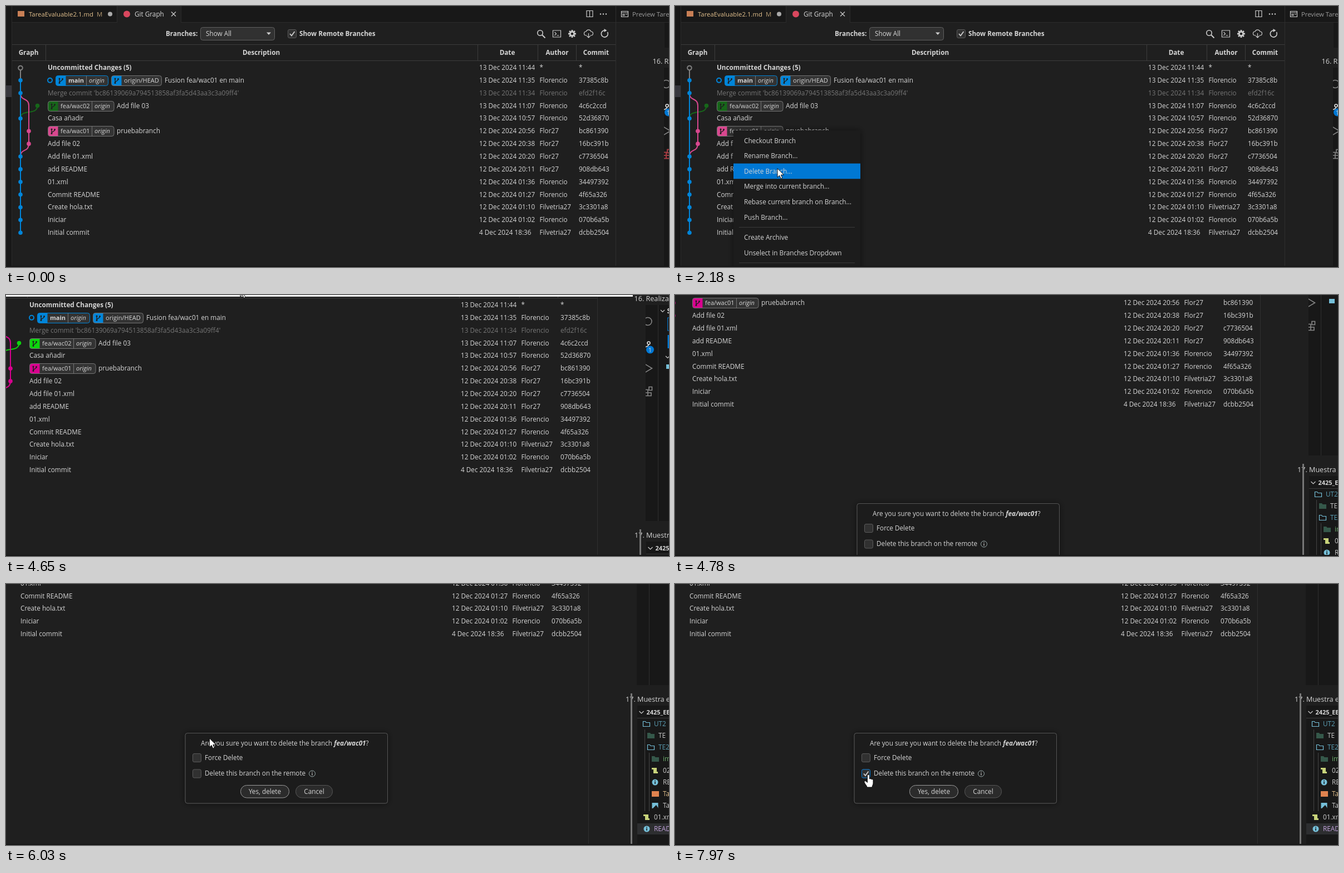
These frames come from a looping animation (1191x470 px, 8000 ms). An HTML page:

```html
<!DOCTYPE html>
<html lang="en">
<head>
<meta charset="utf-8">
<title>Deleting a branch</title>
<style>
  html, body { margin: 0; width: 100%; height: 100%; overflow: hidden; background: #1f1f1f; }
  svg { display: block; }
  text { font: 11.75px "Open Sans", "Noto Sans", sans-serif; fill: #d6d6d6; white-space: pre; }
  .b { font-weight: 700; font-size: 11.7px; }
  .i { font-style: italic; }
  .tag { font-size: 11px; }
  .tab { font-size: 11.35px; }
  .big { font-size: 12.6px; }
  .line { fill: none; stroke: #ccc; stroke-width: 1.2; }
  .dim { fill: none; stroke: #868686; stroke-width: 1.6; }
  #world { --green: #17661a; --pink: #d9478f; }
  #world.vivid { --green: #0cd60c; --pink: #d9008f; }
</style>
</head>
<body>
<svg id="stage" width="1191" height="470" viewBox="0 0 1191 470"></svg>
<script>
const BLUE = '#0085d9';

// y is the visual middle of the line
const text = (x, y, s, cls = '', attrs = '') =>
  `<text x="${x}" y="${y + 4}" class="${cls}" ${attrs}>${s}</text>`;
const mid = (x, y, s, cls) => text(x, y, s, cls, 'text-anchor="middle"');
const rect = (x, y, w, h, fill, attrs = '') =>
  `<rect x="${x}" y="${y}" width="${w}" height="${h}" fill="${fill}" ${attrs}/>`;
const circle = (x, y, r, fill, attrs = '') =>
  `<circle cx="${x}" cy="${y}" r="${r}" fill="${fill}" ${attrs}/>`;
const path = (d, cls = 'line', attrs = '') => `<path d="${d}" class="${cls}" ${attrs}/>`;
const at = (x, y, body, attrs = '') => `<g transform="translate(${x} ${y})" ${attrs}>${body}</g>`;
const check = (x, y) => path(`M${x - 4} ${y}l3 3.5 5.5-7.5`, 'line', 'style="stroke-width:1.9"');
const box = (x, y, attrs = '') =>
  rect(x + .5, y + .5, 15, 15, '#313131', `rx="2.5" stroke="#5a5a5a" ${attrs}`);

const rowY = i => 111 + 22.86 * i;
const A = 'Florencio', B = 'Flor27', C = 'Filvetria27';
const commits = [
  ['', '13 Dec 2024 11:44', '*', '*'],
  ['', '13 Dec 2024 11:35', A, '37385c8b'],
  ["Merge commit 'bc86139069a794513858af3fa5d43aa3c3a09ff4'", '13 Dec 2024 11:34', A, 'efd2f16c'],
  ['', '13 Dec 2024 11:07', A, '4c6c2ccd'],
  ['Casa añadir', '13 Dec 2024 10:57', A, '52d36870'],
  ['', '12 Dec 2024 20:56', B, 'bc861390'],
  ['Add file 02', '12 Dec 2024 20:38', B, '16bc391b'],
  ['Add file 01.xml', '12 Dec 2024 20:20', B, 'c7736504'],
  ['add README', '12 Dec 2024 20:11', B, '908db643'],
  ['01.xml', '12 Dec 2024 01:36', A, '34497392'],
  ['Commit README', '12 Dec 2024 01:27', A, '4f65a326'],
  ['Create hola.txt', '12 Dec 2024 01:10', C, '3c3301a8'],
  ['Iniciar', '12 Dec 2024 01:02', A, '070b6a5b'],
  ['Initial commit', '4 Dec 2024 18:36', C, 'dcbb2504'],
];

function tag(x, row, w, color, name, split, bold) {
  const y = Math.round(rowY(row) - 9) + .5;
  return rect(x, y, w, 18, '#333', 'rx="4"') +
    `<path d="M${x + 18} ${y}h-14q-4 0-4 4v10q0 4 4 4h14z" style="fill:${color}"/>` +
    at(x + 9, y + 9, path('M-2.5-3V4M3-2.5C3 1-2 0-2.5 3', '', 'fill="none" stroke="#1f1f1f" stroke-width="1.4"') +
      circle(-2.5, -3.5, 1.5, '#1f1f1f') + circle(3, -3, 1.5, '#1f1f1f') + circle(-2.5, 4, 1.5, '#1f1f1f')) +
    rect(x, y, w, 18, 'none', `rx="4" stroke="${bold ? BLUE : '#747474'}"`) +
    text(x + 22.5, rowY(row), name, bold ? 'tag b' : 'tag') +
    (split ? rect(split, y, 1, 18, '#747474') + text(split + 5, rowY(row), 'origin', 'tag i') : '');
}

function topBars() {
  return rect(0, 0, 1260, 29, '#181818') + rect(0, 0, 10, 800, '#181818') +
    rect(0, 143, 10, 21, '#37373d') + rect(10, 0, 1, 800, '#2b2b2b') +
    rect(10, 29, 1250, 1, '#2b2b2b') + rect(200, 0, 114, 30, '#1f1f1f') +
    rect(199, 0, 1, 29, '#2b2b2b') + rect(314, 0, 1, 29, '#2b2b2b') +
    rect(21, 9, 12, 10, '#c87f55') +
    text(41, 14.5, 'TareaEvaluable2.1.md', 'tab', 'style="fill:#e2c08d"') +
    text(163, 14.5, 'M', 'tab', 'style="fill:#b79c74"') + circle(187, 14.5, 4, '#aaa') +
    circle(217, 14.5, 6, '#d9475e') + text(231, 14.5, 'Git Graph') +
    path('M297 10.5l8 8m0-8l-8 8') +
    path('M1043 8.5h11v11h-11zM1048.5 8.5v11') +
    [1068, 1073, 1078].map(x => circle(x, 14.5, 1.2, '#ccc')).join('') +
    path('M1105.5 9.5h12v10h-12zM1105.5 12h12M1108 15h3v2h-3zM1113 15h3') +
    text(1125, 14.5, 'Preview TareaEvaluable2.1.md', 'tab', 'style="fill:#9d9d9d"');
}

function toolbar() {
  const teeth = Array.from({ length: 8 }, (_, k) =>
    rect(-1.4, -7, 2.8, 4, '#ccc', `transform="rotate(${k * 45})"`)).join('');
  return text(287, 50, 'Branches:', 'b') +
    rect(349.5, 38.5, 133, 23, '#313131', 'rx="4" stroke="#606060"') +
    text(359, 50, 'Show All') + '<path d="M468 47.5h8l-4 4.5z" fill="#ccc"/>' +
    box(506, 42) + check(514, 50) + text(527, 50, 'Show Remote Branches', 'b') +
    at(961, 50, circle(-1.5, -1.5, 4.7, 'none', 'class="line" style="stroke-width:1.6"') +
      path('M2 2l5.5 5.5', 'line', 'style="stroke-width:2"')) +
    at(989.5, 50, path('M-7-6H7V6H-7zM-4-3l3 3-3 3M0 3h4')) +
    at(1017, 50, teeth + circle(0, 0, 3.6, 'none', 'stroke="#ccc" stroke-width="2.6"')) +
    at(1046.5, 50, path('M-3 3h-1.5a3.5 3.5 0 0 1 0-7a4.8 4.8 0 0 1 9 0a3.5 3.5 0 0 1 0 7H3M0-1V7M-3 4l3 3 3-3')) +
    at(1075.5, 50, path('M5-3A6 6 0 1 1 0-6', 'line', 'style="stroke-width:1.7"') +
      '<path d="M-1-9l5 3-5 3z" fill="#ccc"/>');
}

function table() {
  const heads = [[40.5, 'Graph'], [458.5, 'Description'], [900.5, 'Date'], [990, 'Author'], [1060, 'Commit']];
  const rows = commits.map(([msg, date, author, hash], i) => {
    const y = rowY(i), dim = i === 2 ? 'style="fill:#757575"' : '';
    return text(75, y, msg, '', dim) + text(850, y, date, '', dim) +
      text(958.5, y, author, '', dim) + text(1029, y, hash, '', dim);
  }).join('');
  return rect(11, 69, 1084, 1, '#3c3c3c') + rect(11, 98, 1084, 1, '#3c3c3c') +
    [71, 847, 955, 1024].map(x => rect(x, 69, 1, 30, '#3c3c3c')).join('') +
    heads.map(([x, s]) => mid(x, 84, s, 'b')).join('') + rows +
    text(75, rowY(0), 'Uncommitted Changes (5)', 'b') +
    circle(79, rowY(1), 4, 'none', `stroke="${BLUE}" stroke-width="2"`) +
    tag(89.5, 1, 94, BLUE, 'main', 144, true) + tag(189.5, 1, 90, BLUE, 'origin/HEAD') +
    text(285, rowY(1), 'Fusion fea/wac01 en main') +
    tag(75.5, 3, 118.5, 'var(--green)', 'fea/wac02', 154) + text(199, rowY(3), 'Add file 03') +
    tag(75.5, 5, 118.5, 'var(--pink)', 'fea/wac01', 154) + text(199, rowY(5), 'pruebabranch');
}

function graph() {
  const stroke = (d, color) => `<path d="${d}" style="fill:none;stroke:${color};stroke-width:2"/>`;
  const dot = (x, i, color) => circle(x, rowY(i), 3.8, '', `style="fill:${color}"`);
  return stroke('M26 115V134', '#808080') +
    stroke('M56.5 179.6C56.5 198 26 184 26 202.5', 'var(--green)') +
    stroke('M26 157C26 172 41 164 41 179.6V248C41 264 26 256 26 271', 'var(--pink)') +
    stroke('M26 134V408', BLUE) +
    circle(26, 111.5, 3.8, '#1f1f1f', 'stroke="#808080" stroke-width="2"') +
    [1, 2, 4, 7, 8, 9, 10, 11, 12, 13].map(i => dot(26, i, BLUE)).join('') +
    dot(56.5, 3, 'var(--green)') + dot(41, 5, 'var(--pink)') + dot(41, 6, 'var(--pink)');
}

function preview() {
  const shot = (x, y, h, body) =>
    `<svg x="${x}" y="${y}" width="110" height="${h}">${rect(0, 0, 110, h, '#181818')}${body}</svg>`;
  const blocks = 'M-2 152.5h6v11h-6M-2 158h12v5.5H4M6 147.5h5.5v6H6z';
  const bar = rect(22, 0, 1, 400, '#2f2f2f') +
    circle(4, 29.5, 7, 'none', 'class="dim"') +
    circle(5.5, 68.5, 2.5, 'none', 'class="dim" style="stroke:#ddd"') +
    path('M5.5 71C5 76 0 74-2 77', 'dim', 'style="stroke:#ddd"') +
    circle(8, 80.5, 7, '#0078d4') + mid(8, 80.5, '1', 'tag') +
    path('M-2 106L11.5 114L-2 122', 'dim') +
    path(blocks, 'dim') + path(blocks, 'dim', 'id="alert" style="stroke:#b03038"') +
    path('M27 9l3.5 3.5L34 9M36 92l3.5 3.5L43 92') + text(38.5, 11, 'S', 'b') +
    rect(39.5, 23, 90, 23, '#1f1f1f', 'stroke="#0078d4"') + rect(39.5, 54, 90, 24, '#0078d4') +
    rect(37, 107, 10, 8, '#75bfd8');
  return rect(1095, 0, 1, 800, '#2f2f2f') + rect(1183, 30, 80, 45, '#181818') +
    text(1161.5, 100, '16. Realiza', 'big') + shot(1182, 111, 389, bar) +
    at(49, 318, text(1113, 208, '17. Muestra el', 'big') + shot(1134, 219, 300, at(-1134, -219, tree())) +
      rect(1122, 197, 3, 300, '#777'));
}

function tree() {
  const folder = (x, y, open) => open
    ? path(`M${x} ${y - 4.5}h4l1.5 2h6.5v7h-12z`, 'line', 'style="stroke:#75bfd8"')
    : `<path d="M${x} ${y - 5}h5l1.5 2h6.5v8h-13z" fill="#35584a"/>`;
  const scroll = (x, y) => `<path d="M${x} ${y - 5}h9v7h2v3h-8v-7h-3z" fill="#c8d37a"/>`;
  const info = (x, y) => circle(x + 6, y, 5.5, '#75bfd8') + rect(x + 5.2, y - 1, 1.6, 4, '#181818') +
    rect(x + 5.2, y - 3.5, 1.6, 1.6, '#181818');
  const item = (x, y, s, color = '#ccc') => text(x, y, s, '', `style="fill:${color}"`);
  return path('M1137.5 229l4 4 4-4') + text(1150.5, 231, '2425_EE', 'b tag') +
    rect(1134, 241, 80, 1, '#3c3c3c') + rect(1134, 431, 80, 20, '#2d2e30') +
    rect(1147, 262, 1, 147, '#444') + rect(1155, 304, 1, 105, '#444') +
    folder(1144.5, 252, true) + item(1164, 252, 'UT2', '#5c9fb5') +
    folder(1152, 273) + item(1172, 273, 'TE') +
    folder(1152.5, 294, true) + item(1172, 294, 'TE2', '#5c9fb5') +
    folder(1160, 315) + item(1180, 315, 'img', '#6fae6f') +
    scroll(1160, 336) + item(1180, 336, '02.xml') +
    info(1160, 357) + item(1180, 357, 'README') +
    rect(1160, 373, 13, 10, '#e0834f') + item(1180, 378, 'Tarea', '#e2c08d') +
    rect(1160.5, 394, 11, 10, '#75bfd8') + '<path d="M1162 404l6-6 4 6z" fill="#181818"/>' + item(1180, 399, 'Tarea') +
    scroll(1145, 420) + item(1164, 420, '01.xml') +
    info(1145, 441) + item(1164, 441, 'README', '#c3a4dd');
}

function dialog() {
  const button = (x, w, stroke, s) =>
    rect(x + .5, 362.5, w, 22.5, '#2b2b2b', `rx="11" stroke="${stroke}"`) + mid(x + w / 2 + .5, 374, s);
  return rect(322, 268.5, 363.5, 126.5, '#1f1f1f', 'rx="4" stroke="#565656" filter="url(#shadow)"') +
    text(350, 287, 'Are you sure you want to delete the branch <tspan class="b i">fea/wac01</tspan>?') +
    box(335, 305) + text(357, 313, 'Force Delete') +
    box(335, 333.5) + text(357, 341, 'Delete this branch on the remote') +
    `<g id="ticked">${box(335, 333.5, 'style="stroke:#0078d4"') + check(343, 341.5)}</g>` +
    circle(550, 341.5, 5.5, 'none', 'class="line" style="stroke:#9aa;stroke-width:1"') +
    path('M550 340.5v4M550 338v1.2') +
    button(421, 87, '#9a9a9a', 'Yes, delete') + button(520, 66, '#565656', 'Cancel');
}

const MENU_TOP = 228.3, MENU_STEP = 27.65;
function menu() {
  const items = ['Checkout Branch', 'Rename Branch...', 'Delete Branch...', 'Merge into current branch...',
    'Rebase current branch on Branch...', 'Push Branch...'];
  return rect(105, 224, 228, 290, '#1f1f1f', 'filter="url(#shadow)"') +
    rect(105, 0, 228, MENU_STEP, '#0078d4', 'id="hover"') +
    items.map((s, i) => text(124, 242.5 + MENU_STEP * i, s)).join('') +
    rect(115, 398, 208, 1, '#3a3a3a') + text(124, 417, 'Create Archive') +
    text(124, 444.5, 'Unselect in Branches Dropdown') + rect(115, 462, 208, 1, '#3a3a3a');
}

document.getElementById('stage').innerHTML =
  `<defs><filter id="shadow" x="-20%" y="-20%" width="140%" height="140%">
    <feDropShadow dx="0" dy="0" stdDeviation="6" flood-color="#000" flood-opacity=".5"/></filter></defs>` +
  rect(0, 0, 1191, 470, '#1f1f1f') +
  `<g id="world">${topBars() + toolbar() + table() + graph() + preview() + at(49, 318, dialog())}</g>` +
  `<g id="menu">${menu()}</g>` +
  rect(0, 0, 1126, 3, '#f0f0f0', 'id="edge"') + rect(0, 468, 1191, 2, '#151515') +
  `<g id="arrow"><path d="M0 0V16L3.7 12.6L6.3 18.3L8.8 17.2L6.4 11.6H11.5Z" fill="#fff" stroke="#000" stroke-width=".9"/></g>
   <g id="hand"><path d="M-2 1.5C-2-.5 2-.5 2 1.5V7.5C3 7 5.500 7 5.500 8.500C6.500 7.500 8.500 8 8.500 10V15C8.500 18 7 19 6.500 22.500H-2.500C-3 19.500-6 17-7.500 13.500C-8 11-5 10.500-3.500 12.500L-2 14Z" fill="#fff" stroke="#000" stroke-width=".9"/></g>`;

const $ = id => document.getElementById(id);
const show = (id, on) => $(id).setAttribute('visibility', on ? 'visible' : 'hidden');
const move = (id, [x, y]) => $(id).setAttribute('transform', `translate(${x.toFixed(2)} ${y.toFixed(2)})`);

// keys: [ms, x, y]
function along(keys, t) {
  const n = keys.findIndex(k => k[0] > t);
  if (n === 0) return keys[0].slice(1);
  if (n < 0) return keys[keys.length - 1].slice(1);
  const [t0, x0, y0] = keys[n - 1], [t1, x1, y1] = keys[n];
  const p = (t - t0) / (t1 - t0);
  return [x0 + (x1 - x0) * p, y0 + (y1 - y0) * p];
}

const pan = [[4490, 0, 0], [4570, -17, -32], [4650, -33, -92], [4780, -44, -210], [4880, -49, -302], [4920, -49, -318]];
const pointer = [
  [90, 335, 462], [330, 235, 375], [600, 135, 260], [860, 105, 226],
  [1640, 105, 226], [1850, 135, 250], [2040, 170, 282], [2180, 184, 292.5],
  [3290, 184, 292.5], [3380, 262, 365], [3500, 376, 468],
  [3929, 376, 490], [3930, 487, 355], [4090, 458, 175], [4300, 421, -13],
  [4750, 421, -13], [4751, 421, -30], [5369, 424, -30], [5370, 424, -14], [5400, 424, -14], [5401, 424, -30],
  [5560, 426, -20], [5800, 408, 130], [6050, 362, 290], [6200, 336, 346], [6370, 350, 353],
  [6410, 350, 353], [6560, 357, 343], [6790, 344.5, 346.5],
  [7340, 344.5, 346.5], [7600, 340, 363], [7800, 344, 352], [7970, 347.5, 343.5],
];

function draw(t) {
  const pos = along(pointer, t);
  const hand = t >= 6200;
  move('world', along(pan, t).map(Math.round));
  $('world').classList.toggle('vivid', t >= 4510);
  show('alert', t < 90);
  show('edge', t >= 4600 && t < 4750);
  show('ticked', t >= 7310);

  const open = t >= 1100 && t < 2700;
  const index = Math.floor((pos[1] - MENU_TOP) / MENU_STEP);
  show('menu', open);
  show('hover', open && index >= 0);
  $('hover').setAttribute('y', MENU_TOP + MENU_STEP * Math.max(index, 0));

  move('arrow', pos);
  move('hand', pos);
  show('arrow', !hand && t >= 90 && !(t >= 3500 && t < 3930));
  show('hand', hand);
}

function tick() {
  draw(performance.now() % 8000);
  requestAnimationFrame(tick);
}
tick();
</script>
</body>
</html>
```
